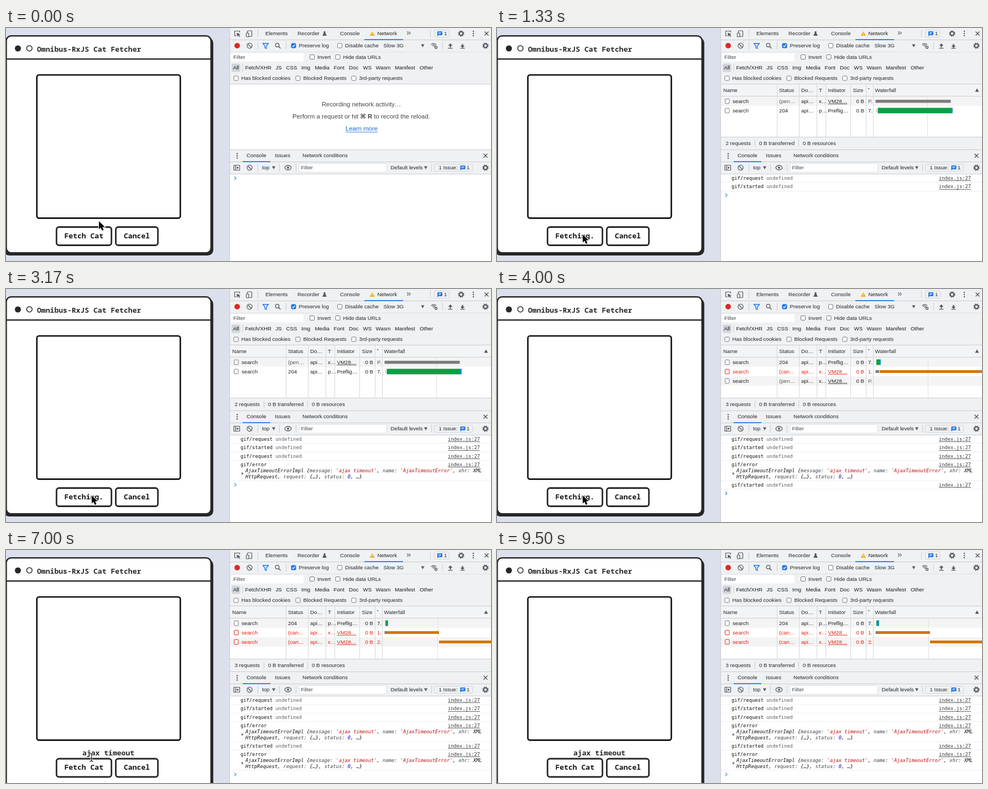
Recreate the animation shown at these times as an HTML page with a canvas. Size 877x422 px, loop 9.67 s.

```html
<!DOCTYPE html>
<html lang="en">
<head>
<meta charset="utf-8">
<title>Cat Fetcher</title>
<style>
html, body { margin: 0; width: 100%; height: 100%; overflow: hidden; background: #dcdfec; }
canvas { display: block; }
</style>
</head>
<body>
<canvas id="stage" width="877" height="422"></canvas>
<script>
const c = document.getElementById('stage').getContext('2d');
const LOOP = 9670, STEP = 1000 / 6;
const SANS = '"Liberation Sans", Arial, sans-serif';
const MONO = '"DejaVu Sans Mono", monospace';
const CARD = '"Noto Sans Mono", "DejaVu Sans Mono", monospace';
const INK = '#272727', TEXT = '#24282c', ICON = '#55595e', BLUE = '#1a73e8', RED = '#e5200f';
const BAR = '#eff1f3', EDGE = '#cbced2';

// Steps at which the recorded state changes
const AT = { start: 8, again: 13, timeout: 18, restart: 20, fail: 30, leave: 52 };

function rect(x, y, w, h, fill) {
  c.fillStyle = fill;
  c.fillRect(x, y, w, h);
}

function box(x, y, w, h, r, fill, stroke, lw = 1) {
  c.beginPath();
  c.roundRect(x, y, w, h, r);
  if (fill) { c.fillStyle = fill; c.fill(); }
  if (stroke) { c.strokeStyle = stroke; c.lineWidth = lw; c.stroke(); }
}

function poly(points, color, lw, close) {
  c.beginPath();
  points.forEach(([x, y], i) => i ? c.lineTo(x, y) : c.moveTo(x, y));
  if (close) c.closePath();
  if (lw) { c.strokeStyle = color; c.lineWidth = lw; c.stroke(); }
  else { c.fillStyle = color; c.fill(); }
}

function circle(x, y, r, color, lw) {
  c.beginPath();
  c.arc(x, y, r, 0, Math.PI * 2);
  if (lw) { c.strokeStyle = color; c.lineWidth = lw; c.stroke(); }
  else { c.fillStyle = color; c.fill(); }
}

// y is the middle of the line; returns the x where the text ends
function text(s, x, y, color = TEXT, font = '9.7px ' + SANS, align = 'left') {
  c.font = font;
  c.textAlign = align;
  c.fillStyle = color;
  c.fillText(s, x, y + 3.4);
  return x + c.measureText(s).width;
}

function linkText(s, x, y, color, font) {
  const end = text(s, x, y, color, font);
  rect(x, Math.round(y + 4.6), end - x, 0.8, color);
}

// Icons
const vline = (x, y) => rect(x, y - 7, 1, 14, EDGE);
const drop = (x, y) => poly([[x - 3, y - 2.5], [x + 3, y - 2.5], [x, y + 3]], ICON);
const dots = (x, y) => [-4, 0, 4].forEach(d => circle(x, y + d, 1.2, ICON));

function gear(x, y) {
  circle(x, y, 3.3, ICON, 2);
  c.setLineDash([2, 1.69]);
  circle(x, y, 4.7, ICON, 1.8);
  c.setLineDash([]);
}

function cross(x, y) {
  poly([[x - 3.5, y - 3.5], [x + 3.5, y + 3.5]], ICON, 1.4);
  poly([[x + 3.5, y - 3.5], [x - 3.5, y + 3.5]], ICON, 1.4);
}

function clearIcon(x, y) {
  circle(x, y, 4.6, ICON, 1.3);
  poly([[x - 3.2, y - 3.2], [x + 3.2, y + 3.2]], ICON, 1.3);
}

function check(x, y, label, on) {
  box(x + 0.5, y - 4, 8, 8, 1.5, on ? BLUE : '#fff', on ? BLUE : '#75787c');
  if (on) poly([[x + 2.3, y], [x + 4, y + 2], [x + 7, y - 2.2]], '#fff', 1.3);
  text(label, x + 14, y);
}

function bubble(x, y) {
  box(x, y - 4, 9, 7, 1, BLUE);
  poly([[x, y], [x, y + 5], [x + 3, y + 2]], BLUE);
  rect(x + 2, y - 2.2, 5, 1, '#fff');
  rect(x + 2, y - 0.2, 4, 1, '#fff');
}

function transfer(x, y, dir) {
  poly([[x, y - 4 * dir], [x - 4, y], [x + 4, y]], ICON);
  poly([[x, y], [x, y + 3 * dir]], ICON, 2.4);
  rect(x - 4, y + 4, 8, 1.3, ICON);
}

function drawCard(shift, busy) {
  rect(0, 0, 405, 422, '#dcdfec');
  const h = 393 + shift * 2;
  box(-4, 17, 378.8, h + 2, 10, INK);
  box(0.4, 14.3, 370.4, h, 9, '#fff', INK, 2.6);
  rect(0, 55, 371, 2.4, INK);
  circle(21.5, 37, 5.5, INK);
  circle(42.3, 36.8, 4.9, INK, 1.5);
  const size = '13.08px ' + CARD;
  text('Omnibus-RxJS Cat Fetcher', 56, 40, INK, '600 ' + size);
  box(55.8, 85, 259.4, 259.4, 4, '#fff', '#0b0b0b', 2.6);
  if (shift) text('ajax timeout', 138, 368.6, INK, '600 ' + size);
  const y = 360.5 + shift;
  box(91.3, y, 99.4, 33, 4.5, '#fff', INK, 2.8);
  box(198.5, y, 76.2, 33, 4.5, '#fff', INK, 2.8);
  text(busy ? 'Fetching.' : 'Fetch Cat', 105.4, y + 17, '#111', 'bold ' + size);
  text('Cancel', 213, y + 17, '#111', 'bold ' + size);
}

function drawTabs() {
  rect(405, 0, 472, 102, BAR);
  rect(405, 21, 472, 1, EDGE);
  rect(405, 43, 472, 1, '#dfe2e5');
  rect(405, 101, 472, 1, EDGE);

  poly([[417, 14], [413.5, 14], [413.5, 5.5], [422.5, 5.5], [422.5, 8]], ICON, 1.2);
  poly([[417, 8.5], [424, 11.5], [421.3, 12.3], [423.5, 15], [422, 16], [420, 13.3], [418.2, 15.4]], ICON);
  box(436.5, 5, 8, 10.5, 1, null, ICON, 1.2);
  box(434.5, 9, 4.5, 7, 1, BAR, ICON, 1.2);
  vline(455, 10);
  text('Elements', 469, 10);
  text('Recorder', 527, 10);
  poly([[574.5, 6], [577.5, 6], [577.5, 9], [580, 14], [572, 14], [574.5, 9]], ICON);
  text('Console', 604, 10);
  poly([[662.3, 6], [666.8, 14], [657.8, 14]], '#f2ab0c');
  rect(661.8, 8.6, 1, 2.8, '#fff');
  rect(661.8, 12.2, 1, 1, '#fff');
  text('Network', 671.5, 10, '#202124');
  rect(648, 20.3, 70, 1.7, BLUE);
  text('»', 724, 9.6, ICON, '15px ' + SANS);
  vline(767, 10);
  box(774.5, 3.5, 27, 13, 2, null, '#d3d6da');
  bubble(780, 10);
  text('1', 792, 10);
  gear(823, 10);
  dots(845, 10);
  cross(869, 10);

  circle(418, 32, 5, '#db2b23');
  clearIcon(440.5, 32);
  vline(455, 32);
  poly([[464.5, 28], [474.5, 28], [470.8, 32.5], [470.8, 37], [468.2, 36], [468.2, 32.5]], BLUE, 1.3, true);
  circle(490.5, 31, 3.3, ICON, 1.3);
  poly([[493, 33.5], [496.5, 37]], ICON, 1.5);
  vline(506, 32);
  check(515.5, 32, 'Preserve log', true);
  check(599, 32, 'Disable cache');
  text('Slow 3G', 682.5, 32);
  drop(753.5, 32);
  [6.3, 3.8, 1.5].forEach(r => {
    c.beginPath();
    c.arc(773.5, 34.5, r, -2.4, -0.75);
    c.strokeStyle = ICON;
    c.lineWidth = 1.2;
    c.stroke();
  });
  circle(777.5, 35, 2, ICON, 1.4);
  vline(789, 32);
  transfer(803.5, 32, 1);
  transfer(825.5, 32, -1);
  gear(867, 32);

  rect(407, 45.5, 131, 15, '#fff');
  text('Filter', 411, 53, '#45494e');
  check(549, 52.5, 'Invert');
  check(595.5, 52.5, 'Hide data URLs');
  box(408, 64.5, 15.5, 15, 3, '#d2d5d9');
  vline(427.5, 72);
  const kinds = { All: 410.5, 'Fetch/XHR': 432.5, JS: 487.5, CSS: 506.5, Img: 534, Media: 558.5, Font: 592.5,
    Doc: 620, WS: 645.5, Wasm: 668.5, Manifest: 703, Other: 748 };
  for (const k in kinds) text(k, kinds[k], 72, '#17191b');
  check(411.5, 91, 'Has blocked cookies');
  check(523.5, 91, 'Blocked Requests');
  check(624.5, 91, '3rd-party requests');
}

function drawHint() {
  rect(405, 102, 472, 118, '#fff');
  const font = '11.35px ' + SANS, bold = 'bold 11.35px "Liberation Sans", "DejaVu Sans", sans-serif';
  const color = '#43464a';
  text('Recording network activity…', 642.5, 138.4, color, font, 'center');
  let x = text('Perform a request or hit ', 518, 160.6, color, font);
  x = text('⌘ R', x, 160.6, color, bold);
  text(' to record the reload.', x, 160.6, color, font);
  linkText('Learn more', 614, 183, '#1565d8', font);
}

const PENDING = ['(pen…', 'x…', 'VM28…', 'P.'];
const PREFLIGHT = ['204', 'p…', 'Preflig…', '7.'];
const canceled = time => ['(can…', 'x…', 'VM28…', time];

function drawRow(i, [status, type, initiator, time]) {
  const y = 132.4 + i * 16.9;
  const failed = status === '(can…', waiting = status === '(pen…';
  const color = failed ? RED : '#1f2225';
  const soft = waiting ? '#55595e' : color;
  box(412.5, y - 4, 7.5, 8.5, 1, '#fff', failed ? RED : '#7a7e83');
  text('search', 426, y, color);
  text(status, 510, y, soft);
  text('api…', 550, y, color);
  text(type, 582, y, color);
  if (initiator[0] === 'V') linkText(initiator, 598.5, y, color);
  else text(initiator, 598.5, y, color);
  text('0 B', 664, y, color, undefined, 'right');
  c.save();
  c.beginPath();
  c.rect(668, y - 8, 11.5, 16);
  c.clip();
  text(time, 671, y, soft);
  c.restore();
}

function drawTable(f) {
  const rows = f < AT.restart ? [PENDING, PREFLIGHT]
    : [PREFLIGHT, canceled('1.'), f < AT.fail ? PENDING : canceled('2.')];
  rect(405, 102, 472, 95, '#fff');
  rect(405, 102, 472, 21, '#f3f4f5');
  rect(405, 123, 472, 1, EDGE);
  for (let i = 0; i < rows.length; i += 2) rect(405, 124 + i * 17, 472, 17, '#f4f4f4');
  [506, 546, 578, 594, 639, 667, 680].forEach(x => rect(x, 102, 1, 95, '#d5d7da'));
  rect(f < AT.restart ? 778 : f < AT.fail ? 779 : 780, 124, 1, 73, '#dfe1e3');

  const heads = { Name: 409, Status: 510, 'Do…': 550, T: 582, Initiator: 598.5, Size: 643.5, Waterfall: 683.5 };
  for (const k in heads) text(k, heads[k], 113);
  rect(671, 109.3, 2.5, 1, TEXT);
  poly([[864.5, 115.5], [871.5, 115.5], [868, 109.5]], ICON);
  rows.forEach((row, i) => drawRow(i, row));

  const GREEN = '#0aa045', TEAL = '#1c93c9', GRAY = '#7d7d7d', ORANGE = '#d07708';
  if (f < AT.restart) {
    rect(684.5, 130, 136, 5.5, GRAY);
    rect(686, 147, 1, 5, '#aaa');
    rect(688.5, 144.5, 133, 10, GREEN);
    rect(821, 144.5, 3, 10, TEAL);
  } else if (f < AT.fail) {
    rect(686, 127.5, 6, 10, GREEN);
    rect(692, 127.5, 2, 10, TEAL);
    rect(684.5, 147, 6.5, 5, GRAY);
    rect(692, 147, 185, 5, ORANGE);
  } else {
    rect(686, 127.5, 3, 10, GREEN);
    rect(689, 127.5, 2, 10, TEAL);
    rect(684.5, 147, 3.5, 5, GRAY);
    rect(688, 147, 95, 5, ORANGE);
    rect(783, 164, 94, 5, ORANGE);
  }

  rect(405, 197, 472, 23, BAR);
  rect(405, 197, 472, 1, EDGE);
  text(rows.length + ' requests', 413.5, 209);
  rect(466, 203, 1, 12, EDGE);
  text('0 B transferred', 474, 209);
  rect(545, 203, 1, 12, EDGE);
  text('0 B resources', 553, 209);
}

function drawDrawer() {
  rect(405, 220, 472, 44, BAR);
  rect(405, 220, 472, 1, EDGE);
  rect(405, 242, 472, 1, EDGE);
  rect(405, 264, 472, 1, EDGE);
  dots(418, 231.5);
  text('Console', 435, 231, '#202124');
  rect(428, 241.3, 50, 1.7, BLUE);
  text('Issues', 486, 231);
  text('Network conditions', 536, 231);
  cross(867, 231.2);

  box(412, 248.5, 10.5, 9, 0.5, null, ICON, 1.2);
  rect(414.5, 248.5, 1.2, 9, ICON);
  poly([[417.3, 250.5], [421, 253], [417.3, 255.5]], ICON);
  clearIcon(440.5, 253);
  vline(455, 253);
  text('top', 463, 252.6);
  drop(484, 253);
  vline(494, 253);
  c.beginPath();
  c.ellipse(510, 253, 5.8, 4, 0, 0, Math.PI * 2);
  c.strokeStyle = ICON;
  c.lineWidth = 1.3;
  c.stroke();
  circle(510, 253, 1.9, ICON);
  vline(524, 253);
  box(530, 245.5, 158.5, 15.5, 1, '#fff', '#dfe1e4');
  text('Filter', 533.5, 253, '#45494e');
  text('Default levels', 695.5, 252.6);
  drop(759, 253);
  vline(769, 253);
  box(774.5, 246.5, 69, 13, 2, null, '#d3d6da');
  text('1 Issue:', 782.5, 252.6);
  bubble(821.5, 253);
  text('1', 833, 252.6);
  gear(867, 253);
}

const KEY = '#3f4347', STRING = '#c00d0d';
const ERROR_LINES = [
  [['AjaxTimeoutErrorImpl {'], ['message: ', KEY], ["'ajax timeout'", STRING], [', '], ['name: ', KEY],
    ["'AjaxTimeoutError'", STRING], [', '], ['xhr: ', KEY], ['XML']],
  [['HttpRequest, '], ['request: ', KEY], ['{…}, '], ['status: ', KEY], ['0', '#1c00cf'], [', …}']]
];

function drawConsole(f) {
  rect(405, 265, 472, 157, '#fff');
  const font = '8.78px ' + MONO, italic = 'italic ' + font;
  const log = [[AT.start, 'request'], [AT.start, 'started'], [AT.again, 'request'],
    [AT.timeout, 'error'], [AT.restart, 'started'], [AT.fail, 'error']];
  let y = 272;
  for (const [at, kind] of log) {
    if (f < at) break;
    const end = text('gif/' + kind, 424, y - 0.5, '#111', font);
    linkText('index.js:27', 799, y - 0.5, '#3a3d41', font);
    if (kind === 'error') {
      ERROR_LINES.forEach((line, i) => {
        let x = 433;
        for (const [s, color = '#111'] of line) x = text(s, x, y + 10.6 * (i + 1), color, italic);
      });
      poly([[426, y + 13.5], [430, y + 16], [426, y + 18.5]], '#6e7276');
      y += 21;
    } else {
      text(' undefined', end, y - 0.5, '#5c6064', font);
    }
    y += 15.4;
    rect(405, Math.round(y - 8), 472, 1, '#efefef');
  }
  poly([[413, y - 3], [416, y], [413, y + 3]], '#4a8af0', 1.3);
}

function drawArrow(x, y) {
  const shape = [[0, 0], [0, 14.5], [3.3, 11.5], [5.8, 17], [8.6, 15.8], [6.2, 10.5], [10.6, 10.3]]
    .map(([dx, dy]) => [x + dx, y + dy]);
  poly(shape, '#fff', 2.2, true);
  poly(shape, '#000');
}

function drawBeam(x, y) {
  const strokes = [[[x - 3, y - 8], [x, y - 6], [x + 3, y - 8]], [[x, y - 6], [x, y + 6]],
    [[x - 3, y + 8], [x, y + 6], [x + 3, y + 8]], [[x - 2, y + 2.5], [x + 2, y + 2.5]]];
  strokes.forEach(s => poly(s, '#fff', 2.6));
  strokes.forEach(s => poly(s, '#111', 1.2));
}

function drawPointer(f) {
  if (f < AT.fail) {
    const p = Math.min(1, Math.max(0, (f - 1) / 5));
    const e = p * p * (3 - 2 * p);
    drawArrow(168 - 13 * e, 350 + 24 * e);
  } else if (f < AT.leave) {
    drawBeam(154.5, 375.5);
  } else {
    const d = f - AT.leave + 1;
    if (d < 4) drawArrow(154 - d * 2, 374 + d * 16);
  }
}

function draw(now) {
  const f = Math.floor((now % LOOP + 5) / STEP);
  const failed = f >= AT.fail;
  drawCard(failed ? 17.5 : 0, f >= AT.start && !failed);
  drawTabs();
  if (f < AT.start) drawHint();
  else drawTable(f);
  drawDrawer();
  drawConsole(f);
  rect(404, 0, 1, 422, EDGE);
  drawPointer(f);
}

const begin = performance.now();
function tick() {
  draw(performance.now() - begin);
  requestAnimationFrame(tick);
}
tick();
</script>
</body>
</html>
```
